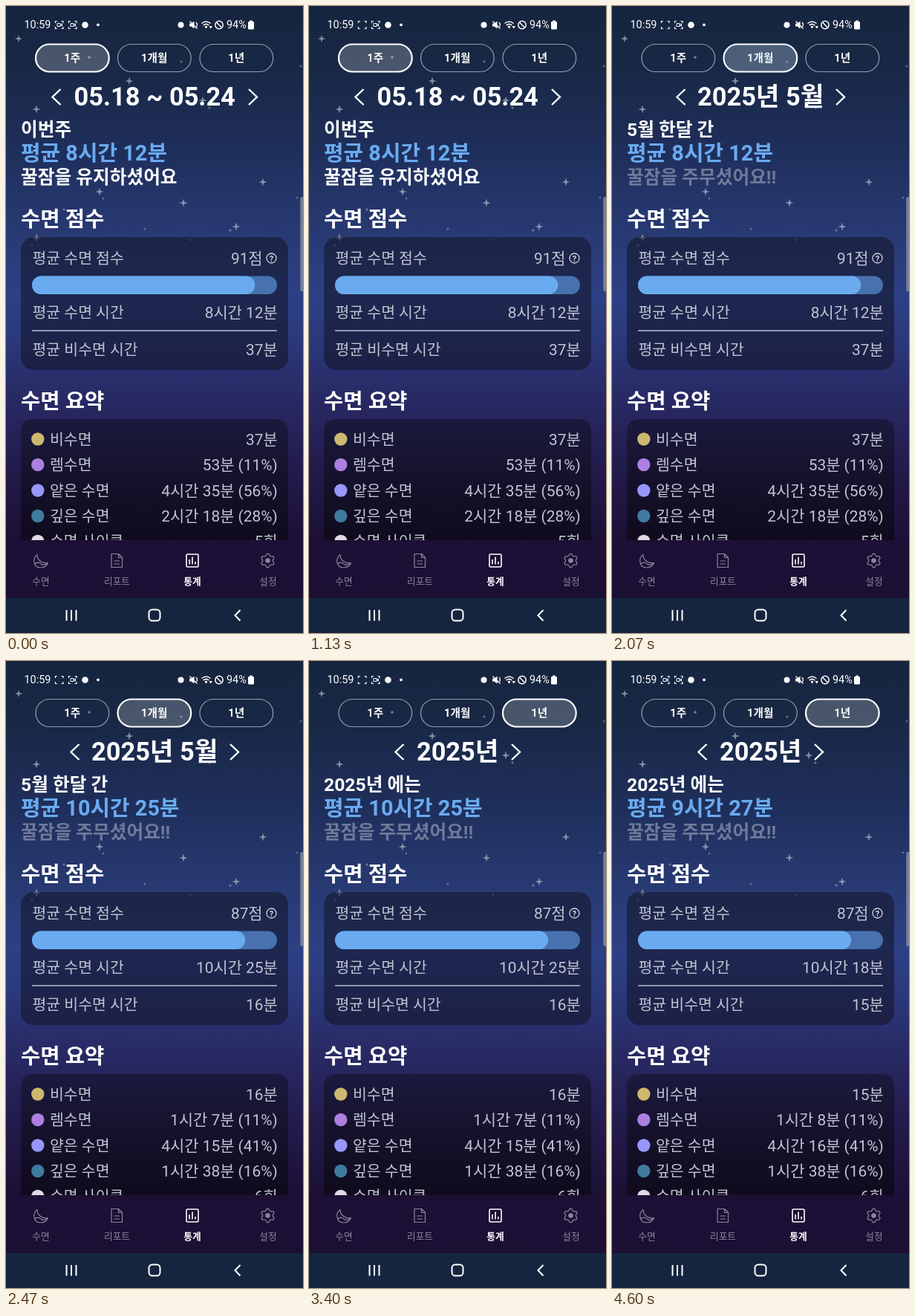
Write an HTML page that moves like this. It is 400 px wide and 844 px high and loops after 4940 ms.

```html
<!DOCTYPE html>
<html lang="ko">
<head>
<meta charset="utf-8">
<title>수면 통계</title>
<style>
html, body { margin: 0; height: 100%; overflow: hidden; background: #16243f; }
svg { display: block; width: 100vw; height: 100vh; font-family: Roboto, 'Noto Sans CJK KR', 'Noto Sans CJK', sans-serif; }
text { fill: #fff; }
.b { font-weight: 700; }
.mid { text-anchor: middle; }
.row text { font-size: 20.5px; fill: #c0c4d1; }
.row .r { font-size: 20.9px; text-anchor: end; }
.line { fill: none; stroke: #fff; }
.nav { stroke: #8a859c; stroke-width: 1.2; fill: none; stroke-linejoin: round; }
.nav text { stroke: none; fill: #8a859c; font-size: 12.7px; text-anchor: middle; }
.nav .on { stroke: #fff; }
.nav text.on { stroke: none; fill: #fff; font-weight: 700; }
</style>
</head>
<body>
<svg id="stage" viewBox="0 0 400 844">
  <defs>
    <linearGradient id="sky" x2="0" y2="1">
      <stop offset="0" stop-color="#16253f"/>
      <stop offset=".09" stop-color="#182743"/>
      <stop offset=".25" stop-color="#1f2f5c"/>
      <stop offset=".4" stop-color="#293b76"/>
      <stop offset=".49" stop-color="#2d4085"/>
      <stop offset=".56" stop-color="#2b397b"/>
      <stop offset=".63" stop-color="#292e6b"/>
      <stop offset=".7" stop-color="#27255d"/>
      <stop offset=".79" stop-color="#221a4a"/>
      <stop offset=".9" stop-color="#1c1036"/>
      <stop offset="1" stop-color="#1b0f34"/>
    </linearGradient>
    <linearGradient id="dark" x2="0" y2="1">
      <stop offset="0" stop-color="#10101f" stop-opacity=".51"/>
      <stop offset="1" stop-color="#08060e" stop-opacity=".68"/>
    </linearGradient>
    <clipPath id="view"><path d="M0 0H400V719H0Z"/></clipPath>
  </defs>
  <rect width="400" height="797" fill="url(#sky)"/>
  <g id="stars" fill="#a9b0c0" opacity=".75"></g>

  <g id="status" fill="#fff" font-size="14.4">
    <text x="24.5" y="30.3">10:59</text>
    <text x="297" y="30.3">94%</text>
    <g class="line" stroke-width="1.2">
      <path id="corners" d="M66.500 23V20.500H69M74.500 20.500H77V23M77 28V30.500H74.500M69 30.500H66.500V28"/>
      <use href="#corners" x="18"/>
      <path id="cam" d="M69 23.500H73V27.500H69ZM73 25.500L75.500 23.800V27.200Z" stroke-width="1"/>
      <path d="M87 23.500H91V27.500H87ZM91 25.500L93.500 23.800V27.200Z" stroke-width="1"/>
      <circle cx="287" cy="25.500" r="5.200" stroke-width="1.500"/>
      <path d="M283.500 22L290.500 29" stroke-width="1.500"/>
      <path d="M263.500 23.500Q269.500 18.500 275.500 23.500M265.700 26Q269.500 22.800 273.300 26" stroke-width="1.500"/>
      <path d="M247.500 20.500L257.500 30.500M256 22Q258.500 25 256.500 28" stroke-width="1.300"/>
    </g>
    <path d="M267.500 27.500Q269.500 26 271.500 27.500L269.500 30.500ZM273.500 27H278L275.700 30.500ZM247 23.500H249.500L253.500 20.500V30.500L249.500 27.500H247Z"/>
    <circle cx="235.500" cy="25.500" r="4"/>
    <circle cx="106.500" cy="25.500" r="4.300"/>
    <circle cx="124" cy="25.300" r="1.900"/>
    <path d="M328 19.500H332V21H333Q334 21 334 22V30Q334 31.500 332.500 31.500H327.500Q326 31.500 326 30V22Q326 21 327 21H328Z"/>
  </g>

  <g id="tabs"></g>
  <text id="title" class="b mid" x="200.200" y="134" font-size="34.400"></text>
  <g class="line" stroke-width="2.400">
    <path id="prev" d="M12 -10.500L1 0L12 10.500"/>
    <path id="next" d="M-12 -10.500L-1 0L-12 10.500"/>
  </g>
  <g class="b" font-size="24.700">
    <text id="span" x="20" y="175"></text>
    <text id="avg" x="20" y="208" font-size="28.900" style="fill:#6aabf0"></text>
    <text id="note" x="20" y="239"></text>
    <text x="20" y="297" font-size="28.600">수면 점수</text>
    <text x="20" y="541.500" font-size="28.600">수면 요약</text>
  </g>

  <rect x="20" y="311" width="360" height="179" rx="17" fill="#10101f" opacity=".51"/>
  <rect x="35" y="363.500" width="330" height="24.500" rx="12.200" fill="#4872ae"/>
  <rect id="bar" x="35" y="363.500" height="24.500" rx="12.200" fill="#6aabf0"/>
  <path d="M35 437H365" stroke="#b9bfd0" stroke-width="1.300"/>
  <circle class="line" cx="357.500" cy="339.500" r="6.500" stroke-width="1.300" opacity=".8"/>
  <text class="mid b" x="357.500" y="343.500" font-size="11" opacity=".8">?</text>
  <g clip-path="url(#view)">
    <path d="M20 740V573Q20 556 37 556H363Q380 556 380 573V740Z" fill="url(#dark)"/>
    <g id="rows" class="row"></g>
  </g>
  <rect x="396.300" y="257" width="5" height="127" rx="2" fill="#9098a8" opacity=".75"/>

  <g class="nav">
    <path d="M42 738.500C38 741 36.500 746 38.500 751C41 748.500 45 748.500 47 751C49.500 753.500 53 752.500 56.500 749.500C48 751 41.500 745 42 738.500ZM38.500 751C40 755 43 756 46.500 756C51.500 756 55 753.500 56.500 749.500"/>
    <path d="M142 737.500H151.500L156.500 742.500V755.500H142ZM151.500 737.500V742.500H156.500M145.500 747H153M145.500 751H153"/>
    <path class="on" stroke-width="1.600" d="M244.500 738H257.500Q259 738 259 739.500V753.500Q259 755 257.500 755H244.500Q243 755 243 753.500V739.500Q243 738 244.500 738ZM247 745V751.500M251 741.500V751.500M255 748V751.500"/>
    <path id="gear"/>
    <circle cx="352.500" cy="746.500" r="2.700" fill="#8a859c"/>
    <text x="47" y="778.500">수면</text>
    <text x="149.500" y="778.500">리포트</text>
    <text x="251" y="778.500" class="on">통계</text>
    <text x="353" y="778.500">설정</text>
  </g>
  <rect y="797" width="400" height="47" fill="#15253f"/>
  <g class="line" stroke-width="2">
    <path d="M81.500 813V827.500M88 813V827.500M94.500 813V827.500M315.500 813L308.500 820.200L315.500 827.500"/>
    <rect x="192.500" y="812.500" width="15" height="15" rx="4.500"/>
  </g>
</svg>
<script>
const LOOP = 4940;
const $ = id => document.getElementById(id);

// x, y, radius
const stars = [[17,44,5], [41,139,5.5], [166,101,5.5], [126,250,5.5], [131,259,2], [112,69,3], [236,75,2.5],
  [346,237,5.5], [239,265,5.5], [310,297,5.5], [302,302,2.5], [41,312,5.5], [35,322,2], [78,274,2.5],
  [187,300,2], [248,315,2], [265,127,5.5], [274,137,2.5], [397,81,2], [392,258,2]];
$('stars').innerHTML = stars.map(([x, y, r]) => {
  const k = r * .24;
  return `<path d="M${x} ${y - r}L${x + k} ${y - k}L${x + r} ${y}L${x + k} ${y + k}L${x} ${y + r}L${x - k} ${y + k}L${x - r} ${y}L${x - k} ${y - k}Z"/>`;
}).join('');

$('gear').setAttribute('d', 'M' + Array.from({ length: 24 }, (_, i) => {
  const a = (i - .5) * Math.PI / 12, r = i % 4 < 2 ? 9.3 : 7;
  return `${352.5 + r * Math.sin(a)} ${746.5 - r * Math.cos(a)}`;
}).join('L') + 'Z');

// Each tab: outline, label, press highlight
$('tabs').innerHTML = ['1주', '1개월', '1년'].map((name, i) => {
  const x = 40 + i * 110.5;
  const box = `<rect x="${x}" y="51.500" width="98.700" height="37" rx="18.500" `;
  return `<g>${box}stroke="#fff"/><text class="b mid" x="${x + 49.2}" y="74.500" font-size="14.600">${name}</text>${box}fill="#6aabf0"/></g>`;
}).join('');
const tabs = [...$('tabs').children];

const rows = [['평균 수면 점수', 347], ['평균 수면 시간', 419.5], ['평균 비수면 시간', 469.5],
  ['비수면', 590.5, '#cdb870'], ['렘수면', 625, '#ac7fe0'], ['얕은 수면', 659.5, '#9796fb'],
  ['깊은 수면', 694, '#3f7b9f'], ['수면 사이클', 728, '#dcdce2']];
$('rows').innerHTML = rows.map(([name, y, color], i) =>
  (color ? `<circle cx="42.800" cy="${y - 7.5}" r="8.700" fill="${color}"/>` : '') +
  `<text x="${color ? 59 : 35.5}" y="${y}">${name}</text><text class="r" x="${i ? 365.8 : 345.6}" y="${y}"></text>`).join('');
const values = document.querySelectorAll('#rows .r');

const periods = [
  { title: '05.18 ~ 05.24', reach: 138.5, span: '이번주', note: '꿀잠을 유지하셨어요', dim: 1 },
  { title: '2025년 5월', reach: 113.5, span: '5월 한달 간', note: '꿀잠을 주무셨어요!!', dim: .35 },
  { title: '2025년', reach: 84.5, span: '2025년 에는', note: '꿀잠을 주무셨어요!!', dim: .35 }
];
// average, score, asleep, awake, REM, light, deep, cycles
const stats = [
  ['8시간 12분', 91, '8시간 12분', '37분', '53분 (11%)', '4시간 35분 (56%)', '2시간 18분 (28%)', 5],
  ['10시간 25분', 87, '10시간 25분', '16분', '1시간 7분 (11%)', '4시간 15분 (41%)', '1시간 38분 (16%)', 6],
  ['9시간 27분', 87, '10시간 18분', '15분', '1시간 8분 (11%)', '4시간 16분 (41%)', '1시간 38분 (16%)', 6]
];
const blinks = [70, 530, 1070, 1600, 2070, 2600, 3070, 3600, 4070, 4600];
const picks = [2000, 3200], loads = [2400, 3600];

const passed = (times, t) => times.filter(s => t >= s).length;
const clamp = v => Math.max(0, Math.min(1, v));

// Highlight of a tab: rises while pressed, fades after the pick
function press(i, t) {
  const d = t - picks[i - 1];
  return .15 * (d < 0 ? clamp((d + 200) / 100) : clamp(1 - d / 200));
}

function draw(now) {
  const t = now % LOOP;
  const sel = passed(picks, t), p = periods[sel];
  const [avg, score, asleep, awake, rem, light, deep, cycles] = stats[passed(loads, t)];

  $('cam').setAttribute('visibility', passed(blinks, t) % 2 ? 'hidden' : 'visible');
  tabs.forEach((tab, i) => {
    const box = tab.firstChild, on = i === sel;
    box.setAttribute('fill', `rgba(255,255,255,${on ? .21 : 0})`);
    box.setAttribute('stroke-width', on ? 2.2 : 1.2);
    box.setAttribute('stroke-opacity', on ? 1 : .55);
    tab.lastChild.setAttribute('opacity', i ? press(i, t) : 0);
  });
  $('title').textContent = p.title;
  $('prev').setAttribute('transform', `translate(${200 - p.reach} 122.500)`);
  $('next').setAttribute('transform', `translate(${200.5 + p.reach} 122.500)`);
  $('span').textContent = p.span;
  $('note').textContent = p.note;
  $('note').setAttribute('opacity', p.dim);
  $('avg').textContent = '평균 ' + avg;
  $('bar').setAttribute('width', 3.3 * score);
  [score + '점', asleep, awake, awake, rem, light, deep, cycles + '회']
    .forEach((v, i) => values[i].textContent = v);
}

let start;
function tick(now) {
  start ??= now;
  draw(now - start);
  requestAnimationFrame(tick);
}
draw(0);
requestAnimationFrame(tick);
</script>
</body>
</html>
```
